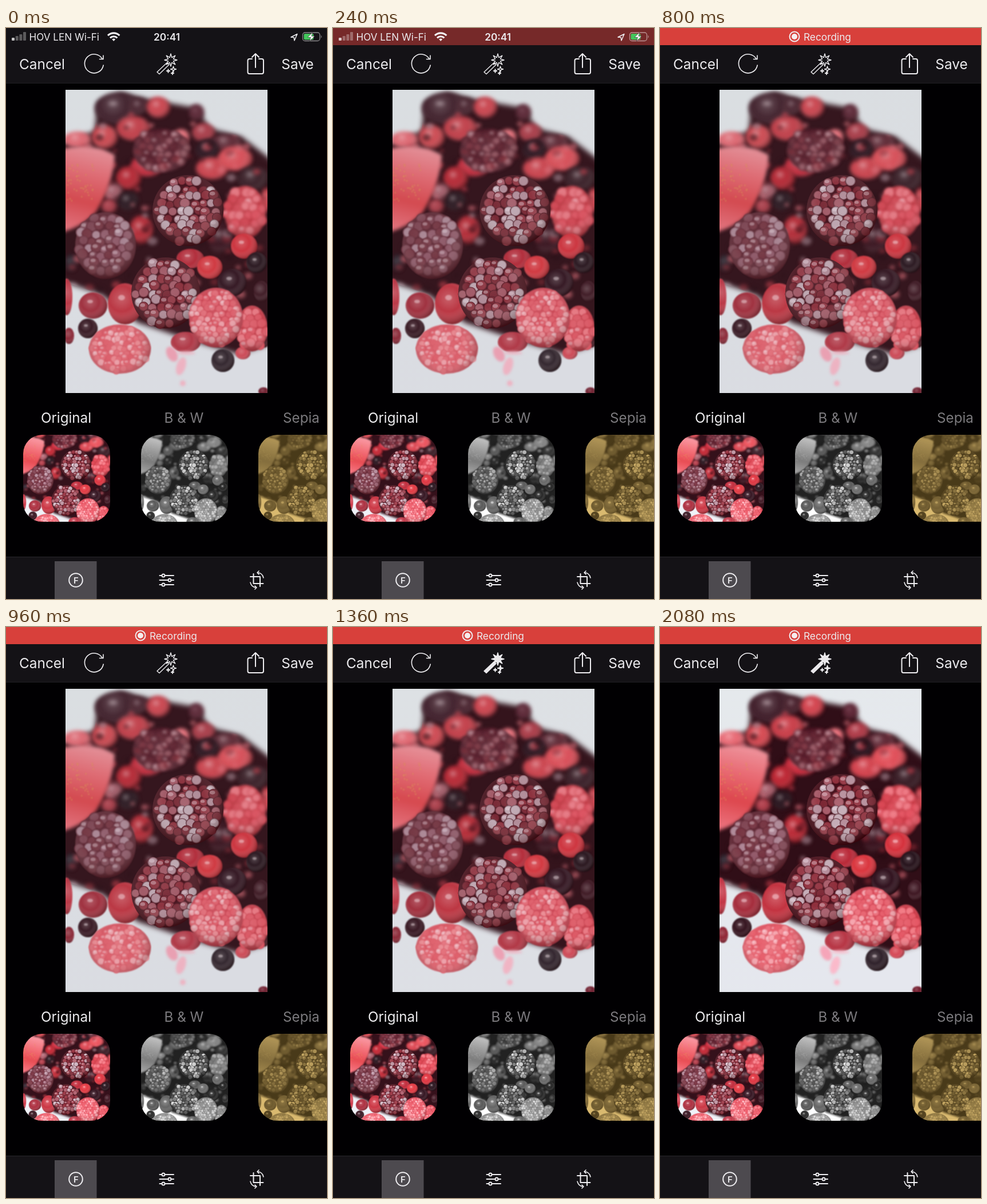
An HTML page with a canvas that plays this animation: 561x998 px, repeating every 2160 ms.

```html
<!DOCTYPE html>
<html lang="en">
<head>
<meta charset="utf-8">
<title>Photo editor</title>
<style>
  html, body { margin: 0; width: 100%; height: 100%; overflow: hidden; background: #000; }
  #stage { position: relative; width: 561px; height: 998px; overflow: hidden; background: #010002; }
  canvas, svg { position: absolute; left: 0; top: 0; }
  #photo { left: 104px; top: 108px; }
  .thumb { top: 711px; border-radius: 33px; }
  text { font-family: Inter, Roboto, sans-serif; fill: #ecebee; }
  .line { fill: none; stroke: #eeedf0; stroke-width: 2; stroke-linecap: round; stroke-linejoin: round; }
</style>
</head>
<body>
<div id="stage">
  <canvas id="photo" width="353" height="530"></canvas>
  <canvas class="thumb" width="152" height="152" style="left:30px"></canvas>
  <canvas class="thumb" width="152" height="152" style="left:236px"></canvas>
  <canvas class="thumb" width="152" height="152" style="left:441px"></canvas>
  <svg width="561" height="998" viewBox="0 0 561 998">
    <!-- status bar -->
    <rect id="bar" width="561" height="30"/>
    <g id="status">
      <g fill="#fff">
        <rect x="10" y="17" width="5" height="5" rx="1" opacity=".75"/>
        <g opacity=".3">
          <rect x="16.7" y="14" width="5" height="8" rx="1"/>
          <rect x="23.4" y="11" width="5" height="11" rx="1"/>
          <rect x="30" y="7" width="5" height="15" rx="1"/>
        </g>
      </g>
      <text x="40.500" y="21.500" font-size="17.100">HOV LEN Wi-Fi</text>
      <g fill="none" stroke="#f2f1f3" stroke-width="3.2">
        <path d="M178 13.2a14.4 14.4 0 0 1 20.4 0M182 17.3a8.8 8.8 0 0 1 12.4 0"/>
        <path d="M188.2 23l-3-3.2a4.6 4.6 0 0 1 6 0z" fill="#f2f1f3" stroke="none"/>
      </g>
      <path class="line" d="M498 16l11-5.500-5 11.500-.8-5.500z" style="stroke-width:1.5"/>
      <rect x="518.500" y="8" width="30" height="14.500" rx="4" fill="none" stroke="#fff" stroke-opacity=".5" stroke-width="1.3"/>
      <path d="M550.500 12.500q2.500 2.700 0 5.500z" fill="#fff" opacity=".5"/>
      <rect x="520.500" y="10" width="17" height="10.500" rx="2" fill="#43c65c"/>
      <path d="M536 7.500l-9 8.800h5.500l-2 6.700 9-8.800H534z" fill="#fff" stroke="#222" stroke-width=".6"/>
    </g>
    <text id="clock" y="21.500" font-size="17.300" font-weight="600" text-anchor="middle">20:41</text>
    <g id="dot">
      <circle r="8.500" class="line"/>
      <circle r="5" fill="#f5eced"/>
    </g>
    <text id="recording" x="292.500" y="21.500" font-size="17.300" text-anchor="middle">Recording</text>

    <!-- tool bar -->
    <rect y="30" width="561" height="67" fill="#141216"/>
    <rect y="96" width="561" height="1" fill="#201e22"/>
    <text x="63" y="72" font-size="24.400" text-anchor="middle">Cancel</text>
    <text x="509.500" y="72" font-size="24.400" text-anchor="middle">Save</text>
    <path class="line" d="M168.500 54.500A16.500 16.500 0 1 0 170.200 65M170 48v6.500h-6.500" style="stroke-width:1.600"/>
    <g id="wand" class="line" style="stroke-width:1.400">
      <path d="M264 77L281.500 60.500l3.500 3.500L268 80.500z"/>
    </g>
    <path class="line" d="M430 54h-4.500q-3 0-3 3v20q0 3 3 3h21.500q3 0 3-3V57q0-3-3-3H442M436 69V45.500M430 51l6-6 6 6"/>

    <!-- filter names -->
    <g font-size="24.200" text-anchor="middle">
      <text x="105" y="690">Original</text>
      <text x="311" y="690" style="fill:#7c7a7e">B &amp; W</text>
      <text x="516" y="690" style="fill:#7c7a7e">Sepia</text>
    </g>

    <!-- tab bar -->
    <rect y="924" width="561" height="74" fill="#141216"/>
    <rect y="924" width="561" height="1" fill="#29272b"/>
    <rect x="85" y="932" width="73.500" height="66" fill="#4d4a4f"/>
    <circle class="line" cx="122" cy="965" r="11.800"/>
    <text x="122.300" y="970.500" font-size="15" font-weight="600" text-anchor="middle">F</text>
    <g class="line">
      <path d="M268.500 957h24.500M268.500 965h24.500M268.500 973h24.500"/>
      <g fill="#141216">
        <circle cx="275" cy="957" r="2.500"/>
        <circle cx="286" cy="965" r="2.500"/>
        <circle cx="275" cy="973" r="2.500"/>
      </g>
      <path d="M432.500 954v17h17M427 959h17v17"/>
      <path d="M439 952q9 0 11 9M442 949l-3 3 3 3M438 978q-9 0-11-9M435 981l3-3-3-3" style="stroke-width:1.600"/>
    </g>
  </svg>
</div>
<script>
const $ = id => document.getElementById(id);
const photo = $('photo'), g = photo.getContext('2d');
const LOOP = 2160, STEP = 80;

let seed = 7;
const rnd = () => (seed = (seed * 16807) % 2147483647) / 2147483647;
const pick = list => list[Math.floor(rnd() * list.length)];

function ellipse(x, y, rx, ry, fill, tilt = 0) {
  g.fillStyle = fill;
  g.beginPath();
  g.ellipse(x, y, rx, ry, tilt, 0, 7);
  g.fill();
}

function radial(x, y, r, ...colors) {
  const grad = g.createRadialGradient(x, y, 0, x, y, r);
  colors.forEach((c, i) => grad.addColorStop(i / (colors.length - 1), c));
  return grad;
}

// Smooth round fruit with a shaded rim and a soft highlight.
function fruit([x, y, rx, ry, color]) {
  ellipse(x, y, rx, ry, color);
  const r = Math.max(rx, ry);
  ellipse(x, y, rx, ry, radial(x - rx * .2, y - ry * .25, r * 1.25, '#fff3', '#fff0', '#1005'));
  if (rx > 13) ellipse(x - rx * .2, y - ry * .3, rx * .2, ry * .13, '#f6e5ea70');
}

// Cluster of small beads packed in offset rows inside an ellipse.
function cluster(x, y, rx, ry, size, base, tones, blur, frost) {
  g.filter = `blur(${blur}px)`;
  ellipse(x, y, rx, ry, base);
  let row = 0;
  for (let v = -ry; v < ry; v += size * 1.4, row++)
    for (let u = -rx + (row % 2) * size * .8; u < rx; u += size * 1.6) {
      const a = u + (rnd() - .5) * size * .7, b = v + (rnd() - .5) * size * .7;
      if ((a / rx) ** 2 + (b / ry) ** 2 > .86) continue;
      const r = size * (.85 + rnd() * .25), tone = pick(tones);
      ellipse(x + a, y + b, r, r * .95, radial(x + a, y + b, r * 1.05, tone, tone, tone, base));
      if (rnd() < frost) ellipse(x + a - r * .2, y + b - r * .25, r * .5, r * .35, '#eee3e960');
    }
  ellipse(x, y, rx, ry, radial(x - rx * .1, y - ry * .2, Math.max(rx, ry) * 1.2, '#fff1', '#fff0', '#2005'));
}

const far = [
  [195, 140, 40, 27, '#43242f'], [232, 136, 17, 14, '#4a2530'], [266, 138, 20, 18, '#c9444e'],
  [333, 147, 13, 14, '#5a2534'], [222, 175, 29, 21, '#c0404a'], [172, 190, 22, 20, '#cc4a52'],
  [125, 195, 24, 14, '#dd6872'], [345, 182, 20, 16, '#a83c48'], [306, 190, 14, 13, '#e8727c'],
  [385, 200, 28, 14, '#5e2a36'], [352, 212, 20, 18, '#2c1620'], [360, 245, 28, 19, '#c8434d'],
  [400, 228, 30, 21, '#d64f58'], [432, 262, 27, 20, '#3a2028'], [245, 241, 28, 18, '#c03040'],
  [214, 262, 21, 20, '#b42834'], [187, 286, 16, 14, '#a05c68'], [213, 302, 18, 16, '#2a1820'],
  [180, 311, 13, 12, '#a83c48'], [236, 352, 20, 24, '#b32c37'], [455, 300, 9, 20, '#c8434d'],
  [375, 368, 20, 28, '#3a1520'], [113, 410, 9, 14, '#2a222c']
];
const near = [
  [416, 381, 23, 22, '#cc3640'], [322, 403, 24, 17, '#b22e3c'], [356, 418, 22, 20, '#d03a42'],
  [395, 445, 25, 24, '#361a25'], [438, 410, 18, 18, '#2c1a22'], [446, 460, 13, 18, '#421e28'],
  [106, 470, 10, 32, '#bb3a48'], [152, 485, 25, 23, '#a03240'], [208, 482, 30, 36, '#bb3844'],
  [314, 549, 26, 18, '#b03a48'], [452, 540, 10, 18, '#421c24'], [143, 525, 17, 17, '#3a1c26'],
  [110, 538, 9, 14, '#8c2c3a'], [414, 568, 13, 11, '#cc4c58'], [379, 581, 20, 20, '#352830'],
  [450, 635, 9, 7, '#702030']
];
const heap = new Path2D('M90 205L155 180 160 130 200 112 250 125 335 140 355 175 412 190 470 235V550L405 570 320 545 230 515 165 465 90 440z');

function paintPhoto() {
  g.translate(-104, -108);
  const back = g.createLinearGradient(104, 108, 300, 638);
  back.addColorStop(0, '#dadee1');
  back.addColorStop(1, '#dadce2');
  g.fillStyle = back;
  g.fillRect(104, 108, 353, 530);

  g.filter = 'blur(5px)';
  g.fillStyle = '#35161e';
  g.fill(heap);

  g.filter = 'blur(3.5px)';
  far.forEach(fruit);
  cluster(272, 214, 50, 38, 8, '#521f2c', ['#7a3844', '#642a36', '#935762'], 2.5, .35);

  // blurred mottling over the heap
  g.save();
  g.clip(heap);
  g.filter = 'blur(3px)';
  for (let i = 0; i < 130; i++) {
    const r = 3 + rnd() * 6;
    ellipse(110 + rnd() * 345, 150 + rnd() * 330, r, r * .8,
      pick(['#c8434f', '#dd7580', '#571f2b', '#8f2f3b', '#b0929c', '#2a1119']) + '90');
  }
  g.restore();

  g.filter = 'blur(3px)';
  const skin = g.createLinearGradient(150, 205, 115, 350);
  ['#e3929a', '#de6c74', '#d34a50', '#e0707a'].forEach((c, i) => skin.addColorStop(i / 3, c));
  g.fillStyle = skin;
  g.fill(new Path2D('M95 212Q150 198 190 222Q188 270 158 320Q138 346 95 358z'));
  g.filter = 'blur(.8px)';
  for (let i = 0; i < 45; i++)
    ellipse(106 + rnd() * 48, 238 + rnd() * 66, 1.3, 1.6, '#d8905899');

  cluster(418, 322, 36, 46, 9, '#c03d48', ['#d95562', '#e37882', '#cf4a56'], 2, .2);
  g.filter = 'blur(1.2px)';
  near.forEach(fruit);
  cluster(430, 525, 27, 40, 8, '#c2404c', ['#da5a66', '#e67a84'], 1.3, .2);

  g.filter = 'blur(2px)';
  ellipse(290, 570, 9, 14, '#e9a0b2', -.5);
  ellipse(306, 591, 8, 16, '#edb3c2', .3);
  ellipse(315, 568, 16, 3, '#e9b8c5');
  ellipse(309, 621, 5, 5, '#edb3c2');

  const dark = ['#8c3440', '#a25c69', '#94404c', '#b08c98', '#782a36', '#bda6b0'];
  const pink = ['#e06e79', '#e78890', '#dc606c', '#eaa0a8'];
  cluster(174, 380, 53, 58, 9, '#5e2935', ['#8f5b6a', '#7f4a57', '#a88492', '#763a46'], 1, .3);
  cluster(318, 319, 62, 62, 9, '#47151f', dark, .6, .4);
  cluster(279, 463, 60, 62, 9, '#4a1620', dark, .6, .35);
  cluster(367, 506, 47, 52, 6.5, '#cb4856', pink, .8, .25);
  cluster(199, 561, 54, 43, 6, '#d55c68', pink, .9, .5);
  g.filter = 'none';
}

function paintThumbs() {
  const looks = ['brightness(1.08) contrast(1.05)', 'grayscale(1) brightness(1.2)', 'grayscale(1) brightness(1.2)'];
  document.querySelectorAll('.thumb').forEach((canvas, i) => {
    const c = canvas.getContext('2d');
    c.filter = looks[i];
    c.drawImage(photo, 0, 88.5, 353, 353, 0, 0, 152, 152);
    if (i < 2) return;
    c.filter = 'none';
    for (const [mode, color] of [['multiply', '#d0ad68'], ['screen', '#33260c']]) {
      c.globalCompositeOperation = mode;
      c.fillStyle = color;
      c.fillRect(0, 0, 152, 152);
    }
  });
}

function star(x, y, points, outer, inner) {
  const path = document.createElementNS('http://www.w3.org/2000/svg', 'path');
  const corners = Array.from({ length: points * 2 }, (_, i) => {
    const r = i % 2 ? inner : outer, a = i * Math.PI / points - Math.PI / 2;
    return `${x + r * Math.cos(a)} ${y + r * Math.sin(a)}`;
  });
  path.setAttribute('d', `M${corners.join('L')}z`);
  $('wand').append(path);
}

const progress = (t, from, to) => Math.min(1, Math.max(0, (t - from) / (to - from)));
const smooth = k => k * k * (3 - 2 * k);
const easeOut = k => 1 - (1 - k) ** 1.5;
const mix = (a, b, k) => `rgb(${a.map((v, i) => Math.round(v + (b[i] - v) * k))})`;

function draw(time) {
  const t = Math.floor((time % LOOP) / STEP) * STEP;
  const alert = progress(t, 80, 400);
  const swap = smooth(progress(t, 480, 720));
  const clockX = 281 + 11 * easeOut(alert);

  $('bar').style.fill = mix([20, 18, 22], [216, 64, 59], smooth(alert));
  $('status').style.opacity = $('clock').style.opacity = 1 - swap;
  $('clock').setAttribute('x', clockX);
  $('dot').style.opacity = progress(t, 240, 400);
  $('dot').setAttribute('transform', `translate(${clockX - 39 - 18 * swap} 15)`);
  $('recording').style.opacity = swap;

  $('wand').style.fill = t >= 1120 ? '#e9e7ea' : 'none';
  const boost = smooth(progress(t, 1200, 1680));
  photo.style.filter = `brightness(${1 + .015 * boost}) contrast(${1 + .08 * boost})`;
}

paintPhoto();
paintThumbs();
star(288, 56, 8, 11, 4.8);
star(283.5, 75, 4, 3, 1);
star(292.5, 72, 4, 5, 1.6);
star(291, 79, 4, 2.5, .9);

const start = performance.now();
(function tick() {
  draw(performance.now() - start);
  requestAnimationFrame(tick);
})();
</script>
</body>
</html>
```
